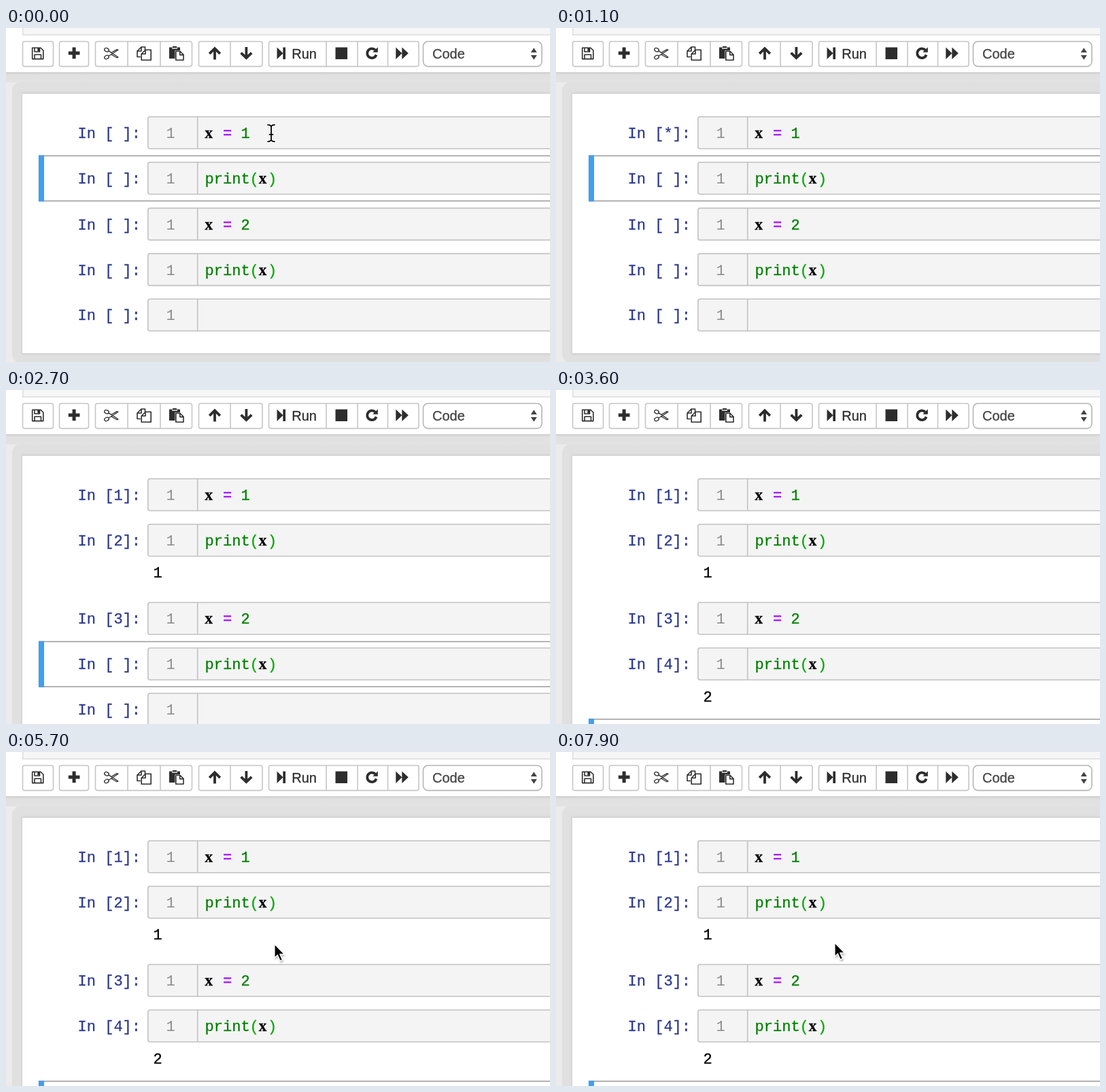
Write an HTML page that moves like this. It is 800x492 px and loops after 8000 ms.

```html
<!DOCTYPE html>
<html lang="en">
<head>
<meta charset="utf-8">
<title>Notebook cells</title>
<style>
  html, body { margin: 0; width: 100%; height: 100%; overflow: hidden; background: #ebebeb; }
  svg { display: block; width: 100vw; height: 100vh; }
  .mono { font: 22px "Liberation Mono", "Courier New", monospace; white-space: pre; stroke-width: .3px; }
  .prompt { fill: #2c3a8e; stroke: #2c3a8e; }
  .num { fill: #8c8c8c; }
  .code, .num-lit { fill: #008000; stroke: #008000; }
  .paren { fill: #0a0; stroke: #0a0; }
  .name { fill: #000; stroke: #000; font: bold 23px "Liberation Serif", "Times New Roman", serif; }
  .op { fill: #aa22ff; stroke: none; font-weight: bold; }
  .out { fill: #000; stroke: #000; }
  .label { font: 20px "Liberation Sans", Arial, sans-serif; stroke-width: .3px; }
  .btn { fill: #fff; stroke: #c6c6c6; stroke-width: 1.6; }
  .ico { fill: #2d2d2d; }
  .line { fill: none; stroke: #2d2d2d; stroke-width: 1.6; stroke-linejoin: round; }
  .thin { stroke-width: 1.3; }
  .thick { fill: none; stroke: #2d2d2d; stroke-width: 3.8; }
  .box { fill: #f4f4f4; stroke: #c2c2c2; stroke-width: 1.6; }
</style>
</head>
<body>
<svg viewBox="0 0 800 492" preserveAspectRatio="none">
  <defs>
    <filter id="soft" x="-5%" y="-5%" width="110%" height="110%"><feGaussianBlur stdDeviation="1.6"/></filter>
    <filter id="drop" x="-40%" y="-40%" width="200%" height="200%"><feGaussianBlur stdDeviation="1.4"/></filter>
    <linearGradient id="fade" x1="0" y1="0" x2="0" y2="1">
      <stop offset="0" stop-color="#d8d8d8"/><stop offset=".3" stop-color="#e1e1e1"/><stop offset="1" stop-color="#e2e2e2"/>
    </linearGradient>
    <path id="ibar" d="M-5 -12.3Q-.8 -12.3 0 -9.5Q.8 -12.3 5 -12.3M-5 12.3Q-.8 12.3 0 9.5Q.8 12.3 5 12.3M0 -9.5V9.5M-2.6 1.8H2.6"/>
  </defs>

  <rect width="800" height="492" fill="#ebebeb"/>
  <rect id="halo" x="9" y="79" width="830" rx="14" fill="#e0e0e0"/>
  <rect id="shade" x="23" y="95.5" width="830" fill="#cdcdcd" filter="url(#soft)"/>
  <rect id="page" x="24" y="97" width="830" fill="#fff"/>
  <rect y="66" width="800" height="14" fill="url(#fade)"/>

  <rect id="frame" x="48.7" width="800" height="66.4" fill="#fff" stroke-width="1.6"/>
  <rect id="bar" x="48" width="8" height="68"/>
  <g id="cells"></g>
  <rect id="caret" x="359" y="144" width="1.6" height="23"/>

  <rect width="800" height="65" fill="#fff"/>
  <rect y="65" width="800" height="2" fill="#d2d2d2"/>
  <path d="M24.7 -2V10.3H802V-2Z" fill="#f6f6f6" stroke="#dedede" stroke-width="1.6"/>
  <g id="buttons"></g>

  <!-- toolbar icons -->
  <path class="line" d="M38.7 29.2H51L54.8 33V45.6H38.7ZM42 29.5V35H49.5V29.5M42 45.3V39.3H51.5V45.3"/>
  <path class="ico" d="M46.3 29.5H49V34H46.3Z"/>
  <path class="ico" d="M97.6 28.5H102.6V34.4H108.5V39.4H102.6V45.2H97.6V39.4H91.8V34.4H97.6Z"/>
  <g class="line thin">
    <ellipse cx="148" cy="32.2" rx="3.4" ry="2.5" transform="rotate(25 148 32.2)"/>
    <ellipse cx="148" cy="43" rx="3.4" ry="2.5" transform="rotate(-25 148 43)"/>
    <path d="M151 33.9L155 36.2L163 31.6L165 32.3L151 41.3M151 33.9L165 43L163 43.8L155 39.2"/>
  </g>
  <path class="line" d="M198 42.5H193V34L199 28H204.5V32M199 28.4V34H193.4M205 32.3H213.2V47.2H199.2V38.2ZM205 32.6V38.2H199.5"/>
  <path class="ico" d="M240 28.5H245V27H251V28.5H256V33H248.5V45H240Z"/>
  <path class="line" d="M249.8 34.3H256L261 39.3V47.2H249.8ZM255.7 34.5V39.6H261"/>
  <path d="M244 29.9H252" stroke="#fff" stroke-width="1.4"/>
  <path class="thick" d="M299.2 37.8L307 30.2L314.8 37.8M307 31V46.5"/>
  <path class="thick" d="M345.6 36.6L353.4 44.2L361.2 36.6M353.4 43.5V28"/>
  <path class="ico" d="M398.5 28.5L407.5 37.3L398.5 46ZM407.3 28.5H411V46H407.3Z"/>
  <path class="ico" d="M484.5 28.5H502V46H484.5Z"/>
  <path class="thick" d="M543.2 32.6A6.9 6.9 0 1 0 544.6 39.5"/>
  <path class="ico" d="M546.8 28.3V35.8H539.3Z"/>
  <path class="ico" d="M573.3 28.5L582.3 37.3L573.3 46ZM582.3 28.5L591.8 37.3L582.3 46Z"/>
  <text class="label" x="420.3" y="44.5" fill="#2d2d2d" stroke="#2d2d2d">Run</text>
  <text class="label" x="627" y="45" fill="#444" stroke="#444">Code</text>
  <path d="M771.8 36L776.3 29.2L780.8 36ZM771.8 40L776.3 46.8L780.8 40Z" fill="#444"/>

  <!-- pointers, both with their hot spot at 0,0 -->
  <g id="beam" fill="none" stroke-linecap="round">
    <use href="#ibar" stroke="#fff" stroke-width="4"/>
    <use href="#ibar" stroke="#000" stroke-width="1.8"/>
  </g>
  <g id="arrow">
    <path d="M0 1V22L5 17.8L9 26.5L13 24.7L9.2 16.4H16Z" transform="translate(1 2)" opacity=".35" filter="url(#drop)"/>
    <path d="M.8 .8V21.5L5.3 17.2L9 25.8L12.6 24.2L9 15.9H15.6Z" stroke="#fff" stroke-width="1.5"/>
  </g>
</svg>
<script>
const $ = id => document.getElementById(id);
const set = (el, attrs) => { for (const k in attrs) el.setAttribute(k, attrs[k]); };
const LOOP = 8000, STEP = 100, CHAR = 13.2, CODE_X = 292.6;

// Toolbar groups: left, right, then dividers
const groups = [[24, 70], [78, 122], [131, 274, 179, 227], [283, 377.5, 330], [386, 607.5, 471, 517, 561.5], [613, 788.5]];
$('buttons').innerHTML = groups.map(([l, r, ...cuts], i) =>
  `<rect class="btn" x="${l + .5}" y="19.8" width="${r - l - 1}" height="36.8" rx="${i == 5 ? 7 : 3}"
    ${i == 5 ? 'style="stroke:#b5b5b5"' : ''}/>` +
  cuts.map(x => `<path class="btn" d="M${x} 20V56.5"/>`).join('')).join('');

// Each piece of code starts on its own character column
const span = (cls, col, s) => `<tspan class="${cls}" x="${CODE_X + CHAR * col}">${s}</tspan>`;
const assign = n => span('name', 0, 'x') + span('op', 2, '=') + span('num-lit', 4, n);
const show = span('code', 0, 'print') + span('paren', 5, '(') + span('name', 6, 'x') + span('paren', 7, ')');

// Run starts at `run`, finishes at `done`; `out` is the printed line
const cells = [
  { top: 130.8, code: assign(1), run: 1000, done: 1300 },
  { top: 197.7, code: show, run: 1900, done: 2200, out: 1 },
  { top: 265.4, code: assign(2), run: 2500, done: 2700 },
  { top: 332.4, code: show, run: 3200, done: 3500, out: 2 },
  { top: 399.2, code: '', run: Infinity, done: Infinity }
];
const OUT_H = 47.6, EDIT = 500;

$('cells').innerHTML = cells.map(c => `<g>
  <rect class="box" x="208.8" y="0" width="640" height="47" rx="3"/>
  <path class="box" d="M281.7 0V47"/>
  <text class="mono prompt" x="105.6" y="31.2">In [<tspan> </tspan>]:</text>
  <text class="mono num" x="${242 - CHAR / 2}" y="31.2">1</text>
  <text class="mono" y="31.2">${c.code}</text>
  ${c.out ? `<text class="mono out" x="216.6" y="78.6">${c.out}</text>` : ''}
</g>`).join('');
[...$('cells').children].forEach((g, i) => {
  cells[i].el = g;
  cells[i].mark = g.querySelector('.prompt tspan');
  cells[i].result = g.querySelector('.out');
});

// Pointer path: time, x, y
const path = [[4500, 390, 155], [4800, 459, 214], [4900, 458, 222], [5300, 401, 238], [5700, 394, 282], [6100, 400, 342]];
function pointer(t) {
  if (t < 1000) return [390, 155];
  if (t < path[0][0]) return null;
  if (t >= 7900) return [409, 280];
  for (let i = 1; i < path.length; i++) {
    const [t0, x0, y0] = path[i - 1], [t1, x1, y1] = path[i];
    if (t <= t1) {
      const k = (t - t0) / (t1 - t0);
      return [x0 + (x1 - x0) * k, y0 + (y1 - y0) * k];
    }
  }
  return path[path.length - 1].slice(1);
}

function render(t) {
  const started = cells.filter(c => t >= c.run).length;
  const editing = t >= EDIT && t < cells[0].run;
  const active = editing ? 0 : Math.max(1, started);
  let shift = 0;
  cells.forEach((c, i) => {
    const done = t >= c.done;
    c.y = c.top + shift;
    set(c.el, { transform: `translate(0 ${c.y})` });
    c.mark.textContent = done ? i + 1 : t >= c.run ? '*' : ' ';
    if (c.out) {
      c.result.style.display = done ? '' : 'none';
      if (done) shift += OUT_H;
    }
  });

  const bottom = 479 + shift;
  set($('halo'), { height: bottom + 15 - 79 });
  set($('shade'), { height: bottom + 1.5 - 95.5 });
  set($('page'), { height: bottom - 97 });

  const y = cells[active].y - 9.4;
  set($('frame'), { y, stroke: editing ? '#66bb6a' : '#a0a0a0' });
  set($('bar'), { y: y - .8, fill: editing ? '#66bb6a' : '#409ff0' });
  $('caret').style.display = editing ? '' : 'none';

  const p = pointer(t);
  const overCode = p && cells.some(c => p[1] > c.y && p[1] < c.y + 47);
  for (const [id, on] of [['beam', p && overCode], ['arrow', p && !overCode]]) {
    $(id).style.display = on ? '' : 'none';
    if (on) set($(id), { transform: `translate(${p[0]} ${p[1]})` });
  }
}

const begin = performance.now();
function tick() {
  const t = (performance.now() - begin) % LOOP;
  render(Math.floor(t / STEP) * STEP);
  requestAnimationFrame(tick);
}
tick();
</script>
</body>
</html>
```
